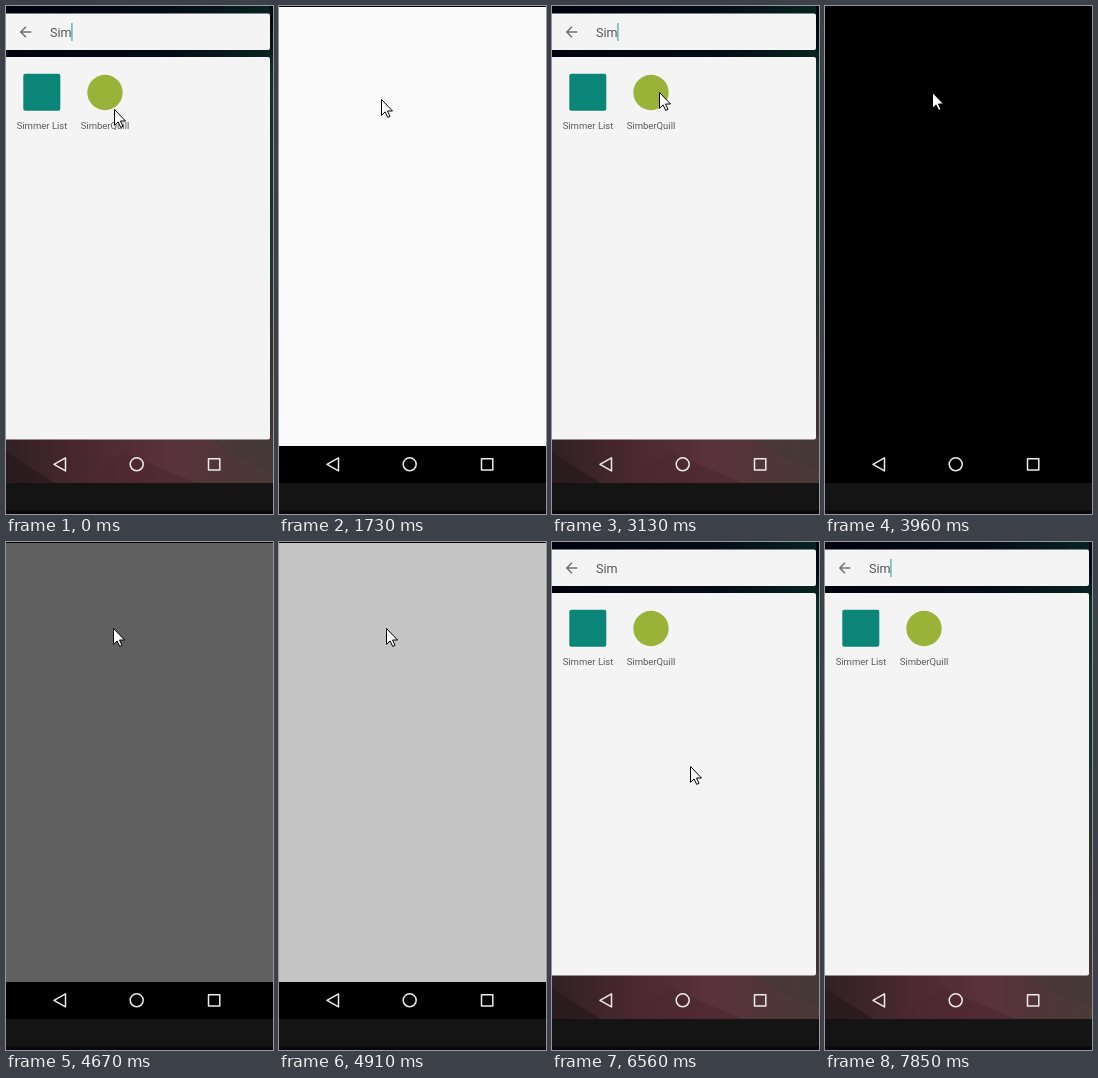
Write an HTML page that moves like this. It is 267 px wide and 508 px high and loops after 8000 ms.

```html
<!DOCTYPE html>
<html lang="en">
<head>
<meta charset="utf-8">
<title>App launcher</title>
<style>
  html, body { margin: 0; width: 100%; height: 100%; overflow: hidden; background: #000; }
  svg { display: block; width: 100%; height: 100%; }
  text { font-family: Roboto, "Open Sans", sans-serif; }
  .label { font-size: 9.5px; fill: #5a5a5a; text-anchor: middle; }
  .nav { fill: none; stroke: #ececec; stroke-width: 1.5; stroke-linejoin: round; }
</style>
</head>
<body>
<svg viewBox="0 0 267 508">
  <defs>
    <linearGradient id="sky" x1="0" y1="0" x2="0" y2="1">
      <stop offset="0" stop-color="#02020f"/>
      <stop offset=".08" stop-color="#04111a"/>
      <stop offset=".13" stop-color="#0b3029"/>
      <stop offset=".45" stop-color="#14362b"/>
      <stop offset=".75" stop-color="#3a3329"/>
      <stop offset="1" stop-color="#4a3536"/>
    </linearGradient>
    <linearGradient id="strip">
      <stop offset="0" stop-color="#02020f"/>
      <stop offset=".6" stop-color="#030a16"/>
      <stop offset="1" stop-color="#08231f"/>
    </linearGradient>
    <linearGradient id="ground">
      <stop offset="0" stop-color="#302124"/>
      <stop offset=".3" stop-color="#4a282f"/>
      <stop offset=".6" stop-color="#5a323b"/>
      <stop offset="1" stop-color="#493a37"/>
    </linearGradient>
  </defs>

  <rect width="267" height="508"/>
  <g id="launcher">
    <rect width="267" height="477" fill="url(#sky)"/>
    <rect width="264" height="60" fill="url(#strip)"/>
    <rect y="430" width="267" height="47" fill="url(#ground)"/>
    <path d="M0 446L48 477H0Z" fill="#25191c" opacity=".7"/>
    <path d="M70 477L118 446 190 477Z" fill="#4b2730" opacity=".6"/>
    <path d="M205 434H267V466L232 452Z" fill="#443a35" opacity=".6"/>
    <g fill="#f4f4f4">
      <rect x="-4" y="7.5" width="268" height="36.5" rx="2"/>
      <rect x="-4" y="51" width="268" height="382.5" rx="2"/>
    </g>
    <path d="M25.3 26H15M20 20.8L14.8 26 20 31.2" fill="none" stroke="#707070" stroke-width="1.5"/>
    <text x="44" y="31" font-size="12.6" fill="#555">Sim</text>
    <rect id="caret" x="65.2" y="17" width="1.4" height="18" fill="#55b8ad"/>
    <rect x="17.3" y="67.7" width="37" height="37" rx="2" fill="#0b8577"/>
    <circle id="icon" cx="99" cy="86.5" r="17.7"/>
    <text class="label" x="36" y="123">Simmer List</text>
    <text class="label" x="99" y="123">SimberQuill</text>
  </g>

  <rect id="navBack" y="440" width="267" height="37"/>
  <rect id="app" width="267"/>
  <g class="nav">
    <path d="M48 458.3L59.5 451.8V464.9Z"/>
    <circle cx="130.7" cy="458.3" r="6.5"/>
    <rect x="202.5" y="452.7" width="11.3" height="11.3"/>
  </g>
  <rect y="477" width="267" height="31" fill="#141414"/>
  <rect y="504.5" width="267" height="3.5" fill="#0b060b"/>
  <path id="pointer" d="M.5 .5V16.3L4.1 12.9 6.7 18.4 9 17.4 6.5 12H11.5Z" fill="#fff" stroke="#000"/>
</svg>
<script>
const LOOP = 8000;
const el = id => document.getElementById(id);
const [launcher, caret, icon, navBack, app, pointer] =
  ["launcher", "caret", "icon", "navBack", "app", "pointer"].map(el);

// Each track holds [start time, ...values]; a value stays until the next start.
const pointerTrack = [
  [0, 108, 103], [820, 102, 92], [940, 95, 84], [1060, 91, 79], [1460, 102, 93],
  [2150, 102, 92], [2270, 104, 88], [2390, 105, 85], [2540, 107, 86],
  [5750, 108, 87], [5900, 111, 95], [6020, 114, 104], [6170, 118, 117],
  [6290, 124, 138], [6410, 130, 161], [6560, 138, 224], [6910, 149, 280],
  [7060, 160, 346], [7180, 175, 438], [7300, 175, 520]
];
const launcherTrack = [
  [0, 1], [1460, 0], [2150, .4], [2270, .8], [2390, 1],
  [3680, 0], [6170, .4], [6290, .8], [6410, 1]
];
// Window: top, bottom, grey level (-1 means no window)
const appTrack = [
  [0, 0, 0, -1], [1460, 1, 440, 250], [1880, 1, 440, 196], [2000, 1, 440, 0],
  [2150, 0, 0, -1], [3410, 12, 336, 250], [3560, 0, 440, 250], [3680, 1, 440, 250],
  [3960, 1, 440, 0], [4670, 1, 440, 96], [4790, 1, 440, 250], [4910, 1, 440, 196],
  [5060, 1, 440, 0], [6170, 0, 0, -1]
];
const caretTrack = [[0, 1], [2540, 0], [3130, 1], [6170, 0], [7060, 1], [7450, 0], [7850, 1]];
const pressTrack = [[0, 0], [560, 1], [2150, 0], [3250, 1], [6170, 0]];

function at(track, t) {
  let row = track[0];
  for (const next of track) if (next[0] <= t) row = next;
  return row.slice(1);
}

function draw(t) {
  const [x, y] = at(pointerTrack, t);
  pointer.setAttribute("transform", `translate(${x} ${y})`);

  const [shown] = at(launcherTrack, t);
  launcher.setAttribute("opacity", shown);
  navBack.setAttribute("opacity", shown ? 0 : 1);
  caret.setAttribute("opacity", at(caretTrack, t)[0]);
  icon.setAttribute("fill", at(pressTrack, t)[0] ? "#72862a" : "#98b337");

  const [top, bottom, grey] = at(appTrack, t);
  app.setAttribute("y", top);
  app.setAttribute("height", bottom - top);
  app.setAttribute("fill", grey < 0 ? "none" : `rgb(${grey},${grey},${grey})`);
}

const start = performance.now();
function tick() {
  draw((performance.now() - start) % LOOP);
  requestAnimationFrame(tick);
}
tick();
</script>
</body>
</html>
```
